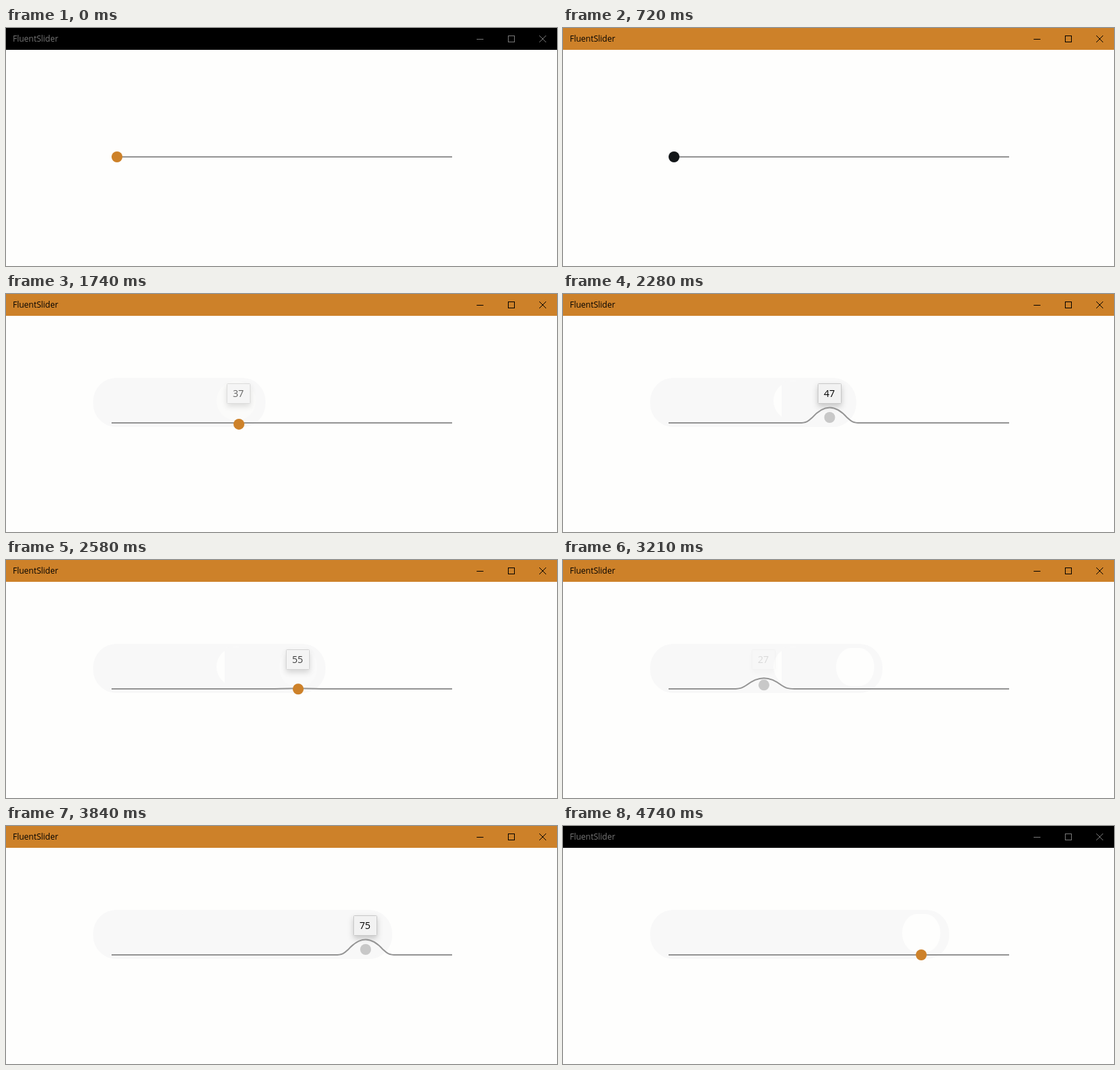
Animation, 809 px wide and 349 px high, one loop 4.86 s. Source, as an HTML page:

```html
<!DOCTYPE html>
<html lang="en">
<head>
<meta charset="utf-8">
<title>FluentSlider</title>
<style>
  html, body { margin: 0; width: 100%; height: 100%; overflow: hidden; background: #fefefd; }
  svg { display: block; }
  text { font-family: "Open Sans", "Noto Sans", sans-serif; }
  #bar, #caption { animation: 4860ms step-end infinite; }
  #bar { fill: #000; animation-name: bar; }
  #caption { color: #777; animation-name: caption; }
  @keyframes bar { 0%, 97.531% { fill: #000; } 14.815% { fill: #cd8129; } }
  @keyframes caption { 0%, 97.531% { color: #777; } 14.815% { color: #000; } }
  #caption text { fill: currentColor; font-size: 12px; }
  #caption path { fill: none; stroke: currentColor; }
  .shade { fill: #f8f8f8; }
  .gap { fill: #fefefd; }
  #box { fill: #f2f2f2; stroke: #c8c8c8; filter: drop-shadow(0 4px 4px rgba(0, 0, 0, .2)); }
  #label { font-size: 14.2px; text-anchor: middle; }
</style>
</head>
<body>
<svg width="809" height="349" viewBox="0 0 809 349">
  <clipPath id="track"><rect x="155" y="100" width="500" height="120"/></clipPath>
  <rect id="bar" width="809" height="32"/>
  <g id="caption">
    <text x="10" y="20">FluentSlider</text>
    <path d="M691 16.5h10M737.5 11.5h9v9h-9z" shape-rendering="crispEdges"/>
    <path d="M783 11l10 10M793 11l-10 10"/>
  </g>
  <rect id="trail" class="shade" x="128" y="123" height="72" rx="34"/>
  <ellipse class="gap" cx="338" cy="156.5" rx="29" ry="29"/>
  <rect class="shade refill" x="321" y="128" height="62" rx="6"/>
  <rect class="gap" x="401" y="129" width="56" height="56" rx="22" ry="28"/>
  <rect class="shade refill" x="258" y="127" height="63" rx="6"/>
  <rect class="gap" x="498" y="129" width="56" height="56" rx="22" ry="28"/>
  <g id="tip">
    <rect id="box" x="-17.5" y="131.5" width="34" height="29" rx="1"/>
    <text id="label" x="-1" y="151"></text>
  </g>
  <path id="line" clip-path="url(#track)" fill="none" stroke="#949494" stroke-width="2"/>
  <circle id="thumb" r="8"/>
</svg>
<script>
const LOOP = 4860, STEP = 30, BASE = 189, LEFT = 163, RANGE = 484;
const drags = [
  { press: 780, release: 1680, start: 1060, end: 1560, from: 163, to: 342, rest: 342, bias: 1.04 },
  { press: 2070, release: 2550, start: 2070, end: 2460, from: 343, to: 430, rest: 429, bias: 1 },
  { press: 3210, release: 3960, start: 3270, end: 3790, from: 295, to: 528, rest: 526, bias: 1 }
];
const $ = id => document.getElementById(id);
const gaps = [...document.querySelectorAll('.gap')];
const refills = [...document.querySelectorAll('.refill')];

const clamp = v => Math.min(1, Math.max(0, v));
const smooth = u => u * u * (3 - 2 * u);
const outCubic = u => 1 - (1 - u) ** 3;
const outBack = u => 1 + 4.2 * (u - 1) ** 3 + 3.2 * (u - 1) ** 2;
const set = (el, attrs) => {
  for (const key in attrs) el.setAttribute(key, attrs[key]);
};

function pose(d, t) {
  if (t >= d.release) {
    const dt = t - d.release;
    const fade = clamp((dt + 20) / 200);
    return { x: d.rest, bump: 1 - outCubic(clamp((dt + 30) / 90)), lift: 1 - outBack(fade), tip: 1 - fade, color: '#cd8129' };
  }
  const dt = t - d.press;
  const rise = outCubic(clamp((dt + 30) / 90));
  const u = clamp((t - d.start) / (d.end - d.start)) ** d.bias;
  return { x: d.from + (d.to - d.from) * smooth(u), bump: rise, lift: rise, tip: clamp((dt + 20) / 170), color: '#c8c8c8' };
}

// Half of the bump, mirrored by sign; the points run from the foot to the peak.
function linePath(x, bump) {
  const h = 22.5 * bump;
  const at = (dx, k) => `${x + dx} ${BASE - k * h}`;
  return `M155 ${BASE}L${at(-45, 0)}`
    + `C${at(-34, 0)} ${at(-31, .12)} ${at(-26, .33)}`
    + `C${at(-17, .78)} ${at(-9, 1)} ${at(0, 1)}`
    + `C${at(9, 1)} ${at(17, .78)} ${at(26, .33)}`
    + `C${at(31, .12)} ${at(34, 0)} ${at(45, 0)}L655 ${BASE}`;
}

function draw(t) {
  const begun = drags.filter(d => t >= d.press);
  const poses = begun.map(d => pose(d, t));
  const now = poses[poses.length - 1]
    || { x: LEFT, bump: 0, lift: 0, tip: 0, color: t < 210 ? '#cd8129' : '#14171a' };
  const far = Math.max(LEFT, ...begun.map(d => pose(d, Math.min(t, d.release - 1)).x));

  set($('trail'), { width: far + 39 - 128, opacity: poses.length ? clamp(poses[0].tip + (t > 1000)) : 0 });
  gaps.forEach((gap, i) => {
    const d = drags[i];
    set(gap, { opacity: t >= d.release ? 1 - poses[i].tip : 0 });
  });
  refills.forEach((el, i) => {
    const d = drags[i + 1];
    const p = poses[i + 1];
    const shown = p && t >= d.press + 60;
    set(el, { width: shown ? Math.max(0, p.x + 20 - el.getAttribute('x')) : 0 });
  });

  set($('tip'), { transform: `translate(${Math.round(now.x)} 0)`, opacity: now.tip });
  $('label').textContent = Math.round((now.x - LEFT) / RANGE * 100);
  set($('line'), { d: linePath(now.x, now.bump) });
  set($('thumb'), { cx: now.x, cy: BASE - 8 * now.lift, fill: now.color });
}

const clock = document.timeline;
function frame() {
  const t = (clock.currentTime - origin) % LOOP;
  draw(Math.floor((t + .5) / STEP) * STEP);
  requestAnimationFrame(frame);
}
const origin = clock.currentTime || 0;
draw(0);
requestAnimationFrame(frame);
</script>
</body>
</html>
```
